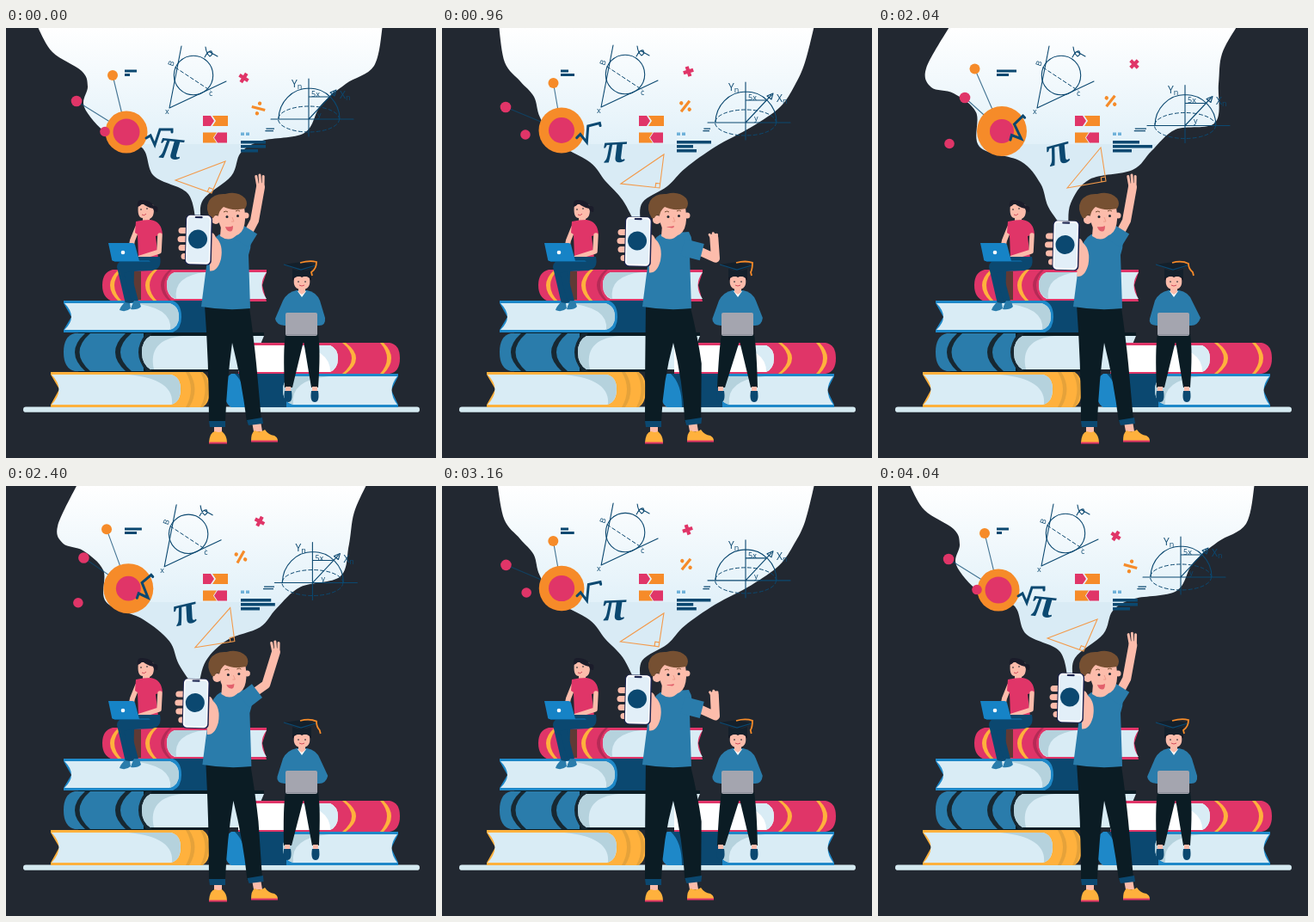
Write an HTML page that moves like this. It is 500x500 px and loops after 4080 ms.

```html
<!DOCTYPE html>
<html lang="en">
<head>
<meta charset="utf-8">
<title>Learning</title>
<style>
html, body { margin: 0; width: 100%; height: 100%; overflow: hidden; background: #222831; }
svg { display: block; width: 100%; height: 100%; }
.ink { fill: none; stroke: #0b4870; stroke-width: 1.1; stroke-linecap: round; stroke-linejoin: round; }
.dash { stroke-dasharray: 4 3; stroke-width: 1; }
.label { fill: #0b4870; font: 12px "Open Sans", sans-serif; }
.small { font-size: 9px; }
.navy { fill: #0b4870; } .blue { fill: #2a7cab; } .sky { fill: #1e88c8; }
.pink { fill: #e03568; } .orange { fill: #f68b29; } .gold { fill: #ffb13d; }
.skin { fill: #fcbcab; } .page { fill: #d9ecf5; } .shade { fill: #b5d2dd; } .black { fill: #0b1c24; }
.limb { fill: none; stroke: #fcbcab; stroke-linecap: round; stroke-linejoin: round; }
</style>
</head>
<body>
<svg viewBox="0 0 500 500">
  <defs>
    <linearGradient id="air" gradientUnits="userSpaceOnUse" x1="0" y1="0" x2="0" y2="135">
      <stop offset="0" stop-color="#fff"/><stop offset="1" stop-color="#e2f1f9"/><stop offset="1" stop-color="#d9ebf5"/>
    </linearGradient>
  </defs>
  <rect width="500" height="500" fill="#222831"/>
  <path id="bubble" fill="url(#air)"/>

  <!-- floating symbols -->
  <g id="circleSketch">
    <circle class="ink" cx="218" cy="55" r="22.7"/>
    <path class="ink" d="M204 21L190 93L256 62"/>
    <path class="ink dash" d="M197 46L238 73"/>
    <path class="ink" d="M232 22Q233 30 237 33Q241 31 239 27Q235 26 231 34M237 28L246 33"/>
    <text class="label small" transform="translate(194 45) rotate(-70)">B</text>
    <text class="label small" x="236" y="79">c</text>
    <text class="label small" x="185" y="100">x</text>
  </g>
  <g id="dome">
    <path class="ink" d="M-44 0H52M0 -47V20M-35 0A35.5 36 0 0 1 36 0M0 0L30 -32M0 -26H23M25 -31L32 -34L30 -27Z"/>
    <ellipse class="ink dash" rx="35.5" ry="15"/>
    <text class="label" x="-20" y="-37">Y<tspan class="small" dy="2">n</tspan></text>
    <text class="label" x="36" y="-24">X<tspan class="small" dy="2">n</tspan></text>
    <text class="label small" x="3" y="-26">5x</text>
    <text class="label small" x="10" y="-2">y</text>
  </g>
  <path id="rods" class="ink" opacity=".75"/>
  <circle id="gear" class="orange"/><circle id="hub" class="pink"/>
  <circle id="ballA" class="orange" r="6"/>
  <circle id="ballB" class="pink" r="6.300"/>
  <circle id="ballC" class="pink" r="5.800"/>
  <path id="root" class="ink" style="stroke-width:3;stroke-linejoin:miter" d="M-15 1L-10 -2L-5 9L1 -9H15V-6"/>
  <text id="pi" class="navy" text-anchor="middle" y="11" style="font:italic bold 50px 'Liberation Serif',serif">π</text>
  <path id="plus" stroke="#e03568" stroke-width="4.200" d="M-6 0H6M0 -6V6"/>
  <g id="divide" class="orange"><rect x="-8" y="-1.600" width="16" height="3.200"/><circle cy="-6" r="2.200"/><circle cy="6" r="2.200"/></g>
  <path class="pink" d="M229 102H238L242 108L238 114H229ZM246 121.500H257V133.500H246L242 127.500Z"/>
  <path class="orange" d="M240 102H258V114H240L244 108ZM229 121.500H245L241 127.500L245 133.500H229Z"/>
  <path fill="#6fb1d9" d="M273 121.500h4v3.500h-4zm6 0h4v3.500h-4z"/>
  <path id="bars" class="navy"/>
  <path id="triangle" fill="none" stroke="#f39a4a" stroke-width="1.100"/>

  <!-- shelf and books -->
  <rect x="20" y="440.500" width="461" height="6.300" rx="3.150" fill="#d5eaf1"/>
  <g>
    <path class="pink" d="M124 281H303V284L298 299L303 318H124Q112 314 112 299Q112 284 124 281Z"/>
    <path class="gold" d="M131 281H135Q117 299 135 318H131Q111 299 131 281ZM172 281H176Q158 299 176 318H172Q152 299 172 281Z"/>
    <path fill="#5f3a35" d="M148 283H157V316H148Z"/>
    <path fill="#b52a56" d="M190 281H193Q175 299 193 318H190Q170 299 190 281Z"/>
    <path class="page" d="M196 284H303Q292 299 303 315H196Q187 311 187 299Q187 287 196 284Z"/>
    <path class="shade" d="M196 284H232Q194 288 198 315Q187 311 187 299Q187 287 196 284Z"/>
  </g>
  <g>
    <path class="sky" d="M67 317H205V354H67V351L76 336L67 320Z"/>
    <path class="navy" d="M194 317H240V354H194Q204 350 204 336Q204 321 194 317Z"/>
    <path class="page" d="M68 320H190Q201 323 201 336Q201 348 190 351H68Q84 336 68 320Z"/>
    <path class="shade" d="M145 320H190Q201 323 201 336Q201 347 191 351Q194 324 145 320Z"/>
  </g>
  <g>
    <path class="black" d="M84 354H300V358H240V400H84Z"/>
    <path class="blue" d="M80 355H160V399H80Q67 396 67 377Q67 358 80 355Z"/>
    <path fill="#172832" d="M92 355H98Q73 377 98 399H92Q68 377 92 355ZM139 355H146Q120 377 146 399H139Q115 377 139 355ZM163 355H170Q147 377 170 399H163Q145 377 163 355Z"/>
    <path class="page" d="M168 358H300L292 377L300 397H168Q158 391 158 377Q158 363 168 358Z"/>
    <path class="shade" d="M168 358H206Q164 362 172 397H168Q158 391 158 377Q158 363 168 358Z"/>
  </g>
  <g>
    <path class="pink" d="M270 366H446Q458 368 458 384Q458 400 446 402H270Z"/>
    <path fill="#fff" d="M270 369H377Q386 373 386 384Q386 396 377 400H270Z"/>
    <path class="page" d="M335 369H377Q386 373 386 384Q386 396 377 400Q378 374 335 369Z"/>
    <path class="gold" d="M391 366H395Q419 384 395 402H391Q413 384 391 366ZM435 366H439Q457 384 439 402H435Q451 384 435 366Z"/>
  </g>
  <g>
    <path class="gold" d="M52 400H228Q237 404 237 420Q237 437 228 441H52V438L62 420L52 403Z"/>
    <path fill="#e5a23a" d="M209 400H213Q226 420 213 441H209Q221 420 209 400ZM226 400H229Q242 420 229 441H226Q237 420 226 400Z"/>
    <path class="page" d="M53 403H192Q203 406 203 420Q203 435 192 438H53Q70 420 53 403Z"/>
    <path class="shade" d="M142 403H192Q203 406 203 420Q203 434 193 438Q196 408 142 403Z"/>
  </g>
  <g>
    <path class="sky" d="M262 402H456V405L448 421L456 438V441H262Q254 437 254 421Q254 406 262 402Z"/>
    <path class="navy" d="M266 402H326V441H279Q279 414 266 402Z"/>
    <path class="page" d="M334 405H455Q442 421 455 438H334Q322 435 322 421Q322 408 334 405Z"/>
    <path class="shade" d="M334 405H376Q330 409 334 438Q322 435 322 421Q322 408 334 405Z"/>
  </g>

  <!-- girl with laptop -->
  <g>
    <path class="skin" d="M154 205H171Q174 219 167 222V228H159V221Q152 221 154 205Z"/>
    <path fill="#1b1c2a" d="M153 208Q152 199 158 200Q168 200 172 207Q178 206 176 214Q172 214 171 210Q163 208 159 204Q156 207 153 208Z"/>
    <path d="M157 210v2M164 209v2" stroke="#222831"/><path d="M158 217q3 2 5 -1" fill="none" stroke="#d24d5c"/>
    <path class="limb" stroke-width="6" d="M153 232L147 247L146 252"/>
    <path class="pink" d="M151 225Q159 223 168 223Q181 225 182 240L174 242L177 268H154L153 240L150 238Z"/>
    <path class="limb" stroke-width="5.500" d="M179 241L178 260L156 267"/>
    <path class="navy" d="M154 266H179Q182 280 170 282L149 283L148 319L139 321L129 278Q129 271 138 270Z"/>
    <path d="M141 284L150 318" fill="none" stroke="#0b4870" stroke-width="8"/>
    <path class="blue" d="M138 319L144 320L145 326Q139 331 132 328Q133 324 138 319ZM149 317L155 318L157 324Q153 328 145 327Q146 323 149 317Z"/>
    <path fill="#0c5e93" d="M125 270H166L168 272H126Z"/>
    <path fill="#1683c6" d="M119 250H147Q149 250 150 252L155 271H126Q123 271 123 269Z"/>
    <circle cx="136" cy="261" r="2.300" fill="#fff"/>
  </g>

  <!-- graduate -->
  <g>
    <path id="gradLegs" class="black"/>
    <g id="gradFootL"><path class="skin" d="M325 417h6v8h-6z"/><path class="navy" d="M324 422H332Q334 435 328 435Q322 435 324 422Z"/></g>
    <g id="gradFootR"><path class="skin" d="M356 417h6v8h-6z"/><path class="navy" d="M355 422H363Q365 435 359 435Q353 435 355 422Z"/></g>
    <path id="gradTop" class="blue"/>
    <path fill="#fff" d="M339 306L344 313L349 306Z"/>
    <path class="skin" d="M340 300h8v7l-4 3l-4 -3z"/>
    <path fill="#131722" d="M333 283H355V293Q344 296 333 293Z"/>
    <path class="skin" d="M335 291Q340 287 344 290Q349 287 353 291Q355 304 344 304Q333 304 335 291Z"/>
    <path d="M340 294v2M348 294v2" stroke="#222831"/><path d="M341 299q3 2 6 0" fill="none" stroke="#d24d5c"/>
    <path fill="#14202b" d="M323 275L343 272L362 276L344 283ZM333 280Q344 285 355 280V290Q344 287 333 290Z"/>
    <path d="M323 275L343 281L360 276" fill="none" stroke="#0b4870" stroke-width="1.200"/>
    <path id="tassel" fill="none" stroke="#f68b29" stroke-width="1.800"/>
    <rect x="325" y="331" width="37" height="27" rx="2" fill="#a4a5af"/>
    <path d="M325 356.500H362" stroke="#8c8e99"/>
  </g>

  <!-- boy with phone -->
  <g>
    <path class="skin" d="M242 462h9v10h-9zM286 458l10 -1l2 12h-10z"/>
    <path class="gold" d="M236 482Q237 470 243 469Q248 471 251 469Q257 474 257 482ZM285 480Q285 471 289 468Q296 471 301 467Q305 473 312 474Q316 476 316 480Z"/>
    <path class="pink" d="M236 481.500H257V483.500H236ZM285 479.500H316V481.500H285Z"/>
    <path id="pants" class="black"/>
    <path id="cuffs" class="navy"/>
    <path id="arm" class="limb" stroke-width="10"/>
    <path id="fingers" class="limb" stroke-width="3"/>
    <g id="body">
      <path class="blue" d="M248 240Q238 245 235 262L227 324Q256 329 284 326L282 264Q288 248 281 237L266 238Z"/>
    </g>
    <path id="sleeve" fill="none" stroke="#2a7cab" stroke-width="20"/>
    <g id="head">
      <path class="skin" d="M250 230H269V240Q260 250 249 242Z"/>
      <circle class="skin" cx="244" cy="223" r="5"/><circle class="skin" cx="279" cy="218" r="3.500"/>
      <path class="skin" d="M246 208H277Q282 241 263 242Q246 241 246 208Z"/>
      <path fill="#765032" d="M238 221Q231 210 236 201Q242 192 255 193Q269 189 278 198Q282 204 278 210Q263 213 253 208Q248 212 247 218Q243 216 241 221Z"/>
      <path d="M253 214q3 -2 5 0M267 213q3 -2 5 0" fill="none" stroke="#765032"/>
      <circle cx="257" cy="219.500" r="1.500" fill="#222831"/><circle cx="269.500" cy="218.500" r="1.500" fill="#222831"/>
      <path d="M263 220l2 5h-3" fill="none" stroke="#ea9585" stroke-width=".8"/>
      <path id="mouth" fill="#e2606c"/>
    </g>
  </g>
  <g id="phone">
    <path class="skin" d="M12 -7Q17 -11 20 -3Q29 5 26 22Q22 37 13 36Z"/>
    <path class="limb" stroke-width="7" d="M-10 -11H-20M-10 -1H-21M-10 9H-20M-10 19H-17"/>
    <g transform="rotate(1.500)">
      <rect x="-15.500" y="-29" width="31" height="58" rx="5" fill="#1c2450"/>
      <rect x="-14.500" y="-28.500" width="28.500" height="56.500" rx="4.500" fill="#fff"/>
      <rect x="-13" y="-26.500" width="25.500" height="52.500" rx="3.500" fill="#e2eff8"/>
      <rect x="-5" y="-27.500" width="9" height="2.200" rx="1" fill="#1c2450"/>
      <circle cx="-1" cy="-1" r="11" fill="#0b4870"/>
    </g>
  </g>
</svg>
<script>
const LOOP = 4080, HALF = LOOP / 2;
const $ = id => document.getElementById(id);
const set = (id, attrs) => { for (const k in attrs) $(id).setAttribute(k, attrs[k]); };
const move = (id, x, y = 0, turn = 0) => set(id, { transform: `translate(${x} ${y}) rotate(${turn})` });
const rows = text => text.split('|').map(row => row.trim().split(/\s+/).map(Number));

// Smooth interpolation through timed rows, at rest at both ends, without overshoot.
function track(times, text) {
  const keys = rows(text), last = times.length - 1;
  const slope = (i, c) => (keys[i + 1][c] - keys[i][c]) / (times[i + 1] - times[i]);
  const tangent = (i, c) => {
    if (i === 0 || i === last) return 0;
    const a = slope(i - 1, c), b = slope(i, c);
    return a * b > 0 ? 2 * a * b / (a + b) : 0;
  };
  return t => {
    let i = 0;
    while (i < last - 1 && t > times[i + 1]) i++;
    const span = times[i + 1] - times[i], u = (t - times[i]) / span, v = 1 - u;
    return keys[i].map((a, c) =>
      a * v * v * (1 + 2 * u) + keys[i + 1][c] * u * u * (3 - 2 * u) +
      span * u * v * (v * tangent(i, c) - u * tangent(i + 1, c)));
  };
}

const drift = text => track([0, 560, 960, 1320, 1560, 2040], text);
const edge = text => track([0, 560, 960, 1560, 2040], text);
const wave = text => track([0, 520, 720, 1020], text);

// Bubble sides, each listed from the top of the stage down to the neck.
const leftEdge = edge(`
  36 -3 54 28 88 50 95 68 91 92 118 123 158 139 172 172 211 192 |
  45 -3 54 27 84 53 95 70 96 95 119 124 159 145 180 175 211 192 |
  66 -3 73 40 91 62 107 80 114 104 133 133 172 156 190 178 210 200 |
  83 -3 62 46 69 66 91 75 113 98 116 134 158 155 190 180 202 206 |
  84 -3 56 47 62 69 88 76 114 98 118 138 166 155 189 181 198 208`);
const rightEdge = edge(`
  438 -3 428 44 395 65 366 90 347 122 298 131 273 145 262 172 229 200 |
  435 -3 424 46 398 70 370 92 350 122 305 136 276 150 264 175 230 198 |
  433 -3 422 40 410 67 393 92 360 115 318 138 283 163 262 184 233 203 |
  421 -3 407 32 400 70 388 103 342 117 314 142 295 164 260 180 234 203 |
  418 -3 400 30 396 65 392 110 346 118 318 143 296 165 246 176 224 204`);

const gear = drift('140 121 24.5 15.5|142 120 25 15.5|139 119 26.5 15|145 121 28 14.5|142 119 29 14.5|144 120 29 14');
const ballA = drift('124 55|124 59|129.5 64|120 59|118.5 52|112.5 47.5');
const ballB = drift('82 85|89.5 86|74 92|95 84|88.5 84|101 81');
const ballC = drift('115 120.5|115 124|97 124|92.5 128|84.5 136|83 134.5');
const root = drift('178 127 0|176 127 -3|171 123 -14|169 118 -26|163 120 -38|164 119 -44');
const pi = drift('192 141 6|194 144 4|201 145 -3|204 144 -6|208 150 -12|210 147 -15');
const sketch = drift('0 0|-1 0|-5 -1|-4 -1|-6 1|-5 0');
const dome = drift('352 106|353 104.5|353 110|353 110|356 112|357 113.5');
const plus = drift('276.5 58 -57|277 54 -22|286.5 50.5 -18|293 48.5 0|294 41 20|298 42 45');
const divide = drift('293.5 93.5 15|292 90 2|283 91 -52|276 89 -42|274 82 -62|270.5 85 -52');
const bars = drift('29 29 20 14 6 6|22 27 22 11 6 6|40 19 23 9 16 9|17 31 34 9 9 10|36 37 22 18 14 13|31 46 22 23 14 14');
const triangle = drift('197 177 255 155 239 192|200 178 256 155 241 193|208 181 258 147 253 186|212 180 257 139 258 179|220 188 261 142 266 181|220 186 259 139 265 178');
const phone = drift('224 246.5|226 248|228 248.5|225 249|222 253|218.5 253');
const tassel = drift('355|356|359|361|364|366');

// Shoulder, elbow, hand, lean, finger length.
const pose = wave('277 247 289 224 296 185 0 14|281 247 310 237 319 201 2.5 11|283 250 318 264 319 238 5.5 5|283 252 318 268 316 244 6 5');

function spline(points) {
  const at = i => points[Math.max(0, Math.min(points.length - 1, i))];
  let d = 'M' + points[0];
  for (let i = 0; i < points.length - 1; i++) {
    const [a, b, c, e] = [at(i - 1), at(i), at(i + 1), at(i + 2)];
    d += 'C' + [0, 1].map(k => b[k] + (c[k] - a[k]) / 6) + ' ' + [0, 1].map(k => c[k] - (e[k] - b[k]) / 6) + ' ' + c;
  }
  return d;
}

function drawBubble(t, [px, py]) {
  const pairs = v => Array.from({ length: v.length / 2 }, (_, i) => [v[2 * i], v[2 * i + 1]]);
  const left = spline([...pairs(leftEdge(t)), [px - 3, py - 20]]);
  const right = spline([[px + 3, py - 20], ...pairs(rightEdge(t)).reverse()]);
  set('bubble', { d: left + right.replace('M', 'L') + 'Z' });
}

function drawSymbols(t) {
  const [gx, gy, outer, inner] = gear(t), a = ballA(t), b = ballB(t), c = ballC(t);
  set('gear', { cx: gx, cy: gy, r: outer });
  set('hub', { cx: gx, cy: gy, r: inner });
  [['ballA', a], ['ballB', b], ['ballC', c]].forEach(([id, [cx, cy]]) => set(id, { cx, cy }));
  set('rods', { d: `M${a}L${gx} ${gy}L${b}` });
  move('root', ...root(t));
  move('pi', ...pi(t));
  move('plus', ...plus(t));
  move('divide', ...divide(t));
  move('circleSketch', ...sketch(t));
  move('dome', ...dome(t));

  const w = bars(t), bar = (x, y, width, h) => `M${x} ${y}h${width}v${h}h${-width}z`;
  const tiny = 4 + w[3] * .4;
  set('bars', { d: [0, 1, 2].map(i => bar(273, 131 + 5 * i, w[i], 3.4)).join('') +
    bar(138, 48.5, w[3], 3) + bar(138, 53, w[4], 3) +
    bar(312 - tiny, 116.5, tiny, 1.3) + bar(311 - tiny, 119, tiny, 1.3) });

  const [x1, y1, x2, y2, x3, y3] = triangle(t);
  const toward = (x, y) => { const n = 5 / Math.hypot(x - x3, y - y3); return [(x - x3) * n, (y - y3) * n]; };
  const u = toward(x1, y1), v = toward(x2, y2);
  set('triangle', { d: `M${x1} ${y1}L${x2} ${y2}L${x3} ${y3}ZM${x3 + u[0]} ${y3 + u[1]}l${v}l${-u[0]} ${-u[1]}` });
}

function drawBoy(q) {
  const [sx, sy, ex, ey, hx, hy, lean, finger] = pose(q);
  const mixX = sx + (ex - sx) * .55, mixY = sy + (ey - sy) * .55;
  set('arm', { d: `M${sx} ${sy}L${ex} ${ey}L${hx} ${hy}` });
  set('fingers', { d: [-3, 0, 3].map(k => `M${hx + k} ${hy}l${k * .4 - 1} ${-finger + Math.abs(k) * .5}`).join('') });
  set('sleeve', { d: `M${sx - 3} ${sy + 3}L${mixX} ${mixY}` });
  move('body', lean);
  move('head', lean);
  const open = 6.5 - lean * .7;
  set('mouth', { d: `M255 231Q260 ${232 - lean * .1} 264 230Q264 ${231 + open} 260 ${230 + open}Q256 ${230 + open * .9} 255 231Z` });
  const ankle = lean * .7, inner = lean * .4;
  set('pants', { d: `M${231 + lean} 322Q256 328 ${283 + lean} 325Q${288 + lean * 1.6} 360 ${291 + lean * 1.8} 390L${297 + ankle} 456L${280 + inner} 458Q${274 + lean} 410 ${263 + lean} 366Q257 410 255 457H236Q236 390 ${231 + lean} 322Z` });
  set('cuffs', { d: `M236 457H255V464H237ZM${280 + inner} 456L${298 + ankle} 453L${299 + inner} 460L${282 + inner} 462Z` });
  return lean / 6;
}

function drawGraduate(t, spread) {
  const s = spread * 4, k = t / HALF;
  set('gradLegs', { d: `M325 356H363Q366 375 ${363 + s} 418H${355 + s}L346 364L${333 - s} 418H${324 - s}Q322 375 325 356Z` });
  move('gradFootL', -s);
  move('gradFootR', s);
  set('gradTop', { d: `M338 305H350Q361 307 365 317L${371 + 4 * k} 337Q372 346 364 346H324Q314 345 ${313 + 3 * k} 338L322 317Q327 307 338 305Z` });
  const [x] = tassel(t);
  set('tassel', { d: `M342 273Q353 270 361 ${272 + 2 * k}Q361 280 ${x} 284l1 4` });
}

function draw(now) {
  const time = now % LOOP;
  const t = time <= HALF ? time : LOOP - time;
  const q = t <= HALF / 2 ? t : HALF - t;
  const p = phone(t);
  drawBubble(t, p);
  drawSymbols(t);
  drawGraduate(t, drawBoy(q));
  move('phone', ...p);
}

const start = performance.now();
function tick() {
  draw(performance.now() - start);
  requestAnimationFrame(tick);
}
tick();
</script>
</body>
</html>
```
